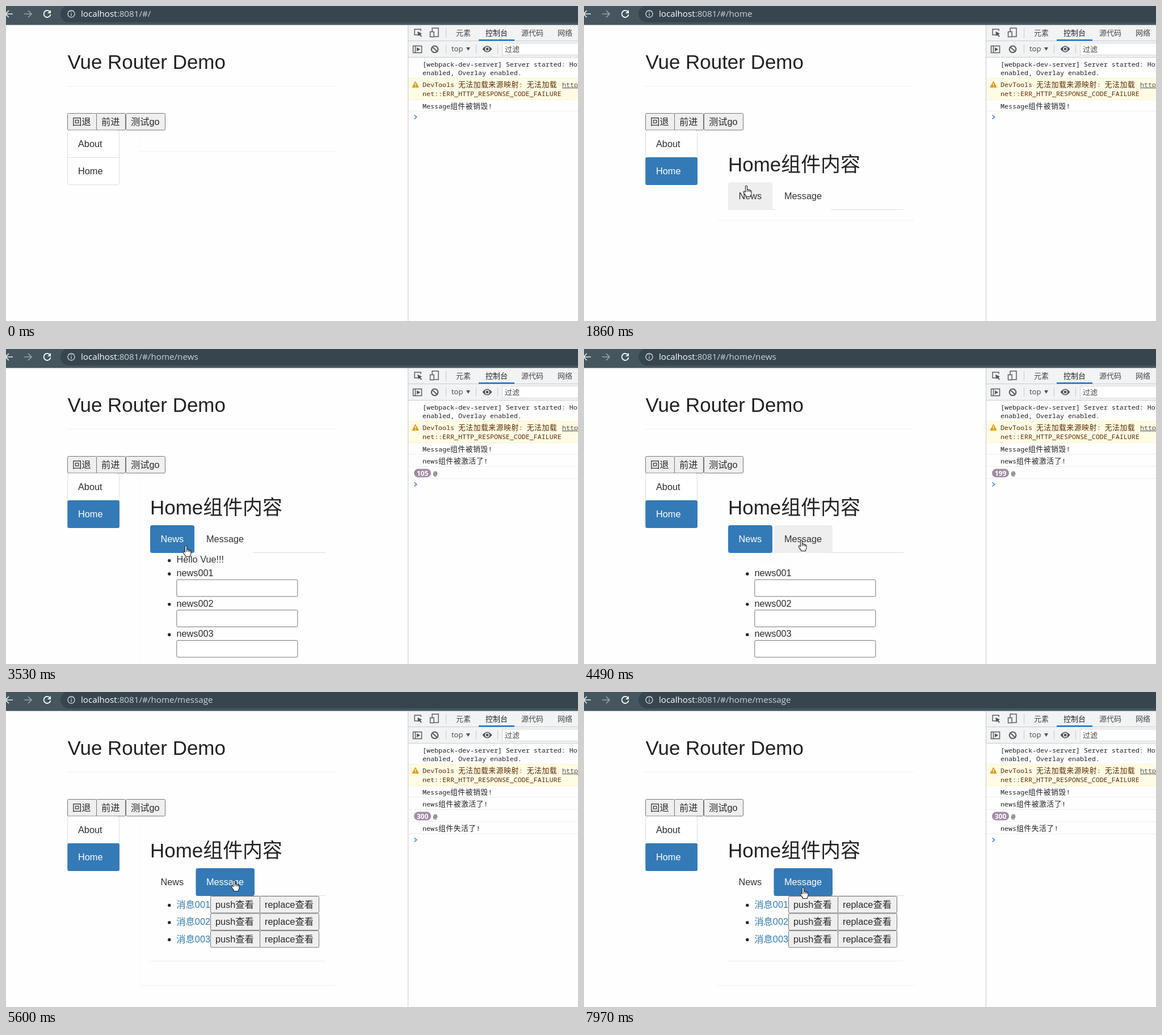
Animation of 1008 by 556 pixels, one loop 8 s. Source, as an HTML page:

```html
<!DOCTYPE html>
<html lang="zh">
<head>
<meta charset="utf-8">
<style>
html, body { margin: 0; width: 100%; height: 100%; overflow: hidden; background: #fefefe; }
svg { display: block; }
text { white-space: pre; }
.page { font: 16.3px "Liberation Sans", "Noto Sans CJK SC", "Noto Sans CJK", sans-serif; fill: #2a2a2a; }
.big { font-size: 34.95px; fill: #222; }
.url { font: 15.2px "Open Sans", "Noto Sans", sans-serif; fill: #ccd3d7; }
.ui { font: 13px "Open Sans", "Noto Sans CJK SC", "Noto Sans CJK", sans-serif; fill: #444; }
.mono { font: 11.66px "Noto Sans Mono", "Noto Sans CJK SC", monospace; fill: #222; }
.cjk { font: 12.8px "Noto Sans CJK SC", "Noto Sans CJK", sans-serif; letter-spacing: .55px; }
.badge { font: bold 12px "Open Sans", "Noto Sans", sans-serif; fill: #fff; text-anchor: middle; }
.icon { fill: none; stroke: #5a5d61; stroke-width: 1.5; }
</style>
</head>
<body>
<svg width="1008" height="556" viewBox="0 0 1008 556"><g id="fixed"></g><g id="live"></g></svg>
<script>
const BLUE = '#337ab7', LOOP = 8000;
// Runs of screen updates: first, last, number of steps
const RUNS = [[130, 900, 12], [1100, 1860, 11], [1930, 2140, 4], [2340, 3100, 11],
  [3180, 3930, 12], [4000, 4780, 12], [4850, 5600, 12], [7190, 7970, 12]];
// Pointer path: time, x, y
const PATH = [[130, 803, 494], [880, 177, 252], [1030, 177, 252], [1400, 158, 288], [1540, 158, 288],
  [1850, 286, 317], [1870, 286, 317], [2140, 286, 331], [2700, 287, 333], [3520, 317, 347],
  [3930, 325, 364], [4150, 345, 389], [4490, 383, 337], [5000, 384, 338], [5520, 402, 332],
  [7120, 402, 332], [7550, 744, 421], [7960, 386, 345]];
const HOME_AT = 1450, NEWS_AT = 2440, MESSAGE_AT = 5530;

const text = (x, y, s, cls = 'page', more = '') => `<text x="${x}" y="${y}" class="${cls}" ${more}>${s}</text>`;
const rect = (x, y, w, h, fill, more = '') => `<rect x="${x}" y="${y}" width="${w}" height="${h}" fill="${fill}" ${more}/>`;
const box = (x, y, w, h, fill, stroke, r = 2) => rect(x + .5, y + .5, w - 1, h - 1, fill, `stroke="${stroke}" rx="${r}"`);
const path = (d, more = 'class="icon"') => `<path d="${d}" ${more}/>`;
const bullet = (y, more = '') => `<circle cx="287.8" cy="${y}" r="2.7" fill="#222" ${more}/>`;
const fill = c => `style="fill:${c}"`;
const mono = (x, y, s, more) =>
  text(x, y, s.replace(/[\u4e00-\u9fff]+/g, '<tspan class="cjk">$&</tspan>'), 'mono', more);
const rule = (x, y, w, c = '#eee') => rect(x, y, w, 1, c);

function button(x, y, w, label, hot) {
  return box(x, y, w, 30.5, hot ? '#e5e5e5' : '#efefef', '#767676') + text(x + 9, y + 21, label);
}

function browserBar() {
  return rect(0, 0, 1008, 33.5, '#45565f') + rect(96, -1, 930, 30, '#37454e', 'rx="15"')
    + path('M12 14H-1M5 8L-1 14L5 20', 'fill="none" stroke="#e8ecee" stroke-width="1.6"')
    + path('M32 14H45M39 8L45 14L39 20', 'fill="none" stroke="#98a4aa" stroke-width="1.6"')
    + path('M77.5 10.5A6 6 0 1 0 78.5 15', 'fill="none" stroke="#fff" stroke-width="1.8"')
    + path('M79 7V13H73Z', 'fill="#fff"')
    + path('M115 8a6 6 0 1 0 .01 0M115 13v4.5M115 10v1.6', 'fill="none" stroke="#d0d6da" stroke-width="1.3"');
}

function devTools() {
  const tabs = [[793, '元素'], [845, '控制台'], [908, '源代码'], [972, '网络']];
  const warn = fill('#5c2b00');
  return rect(709, 34, 299, 522, '#fefefe') + rect(709, 34, 299, 57, '#f1f3f4')
    + rule(709, 61, 299, '#cacdd1') + rule(709, 90, 299, '#cacdd1') + rect(708, 34, 1, 522, '#c5c9cd')
    + tabs.map(([x, s], i) => text(x, 52, s, 'ui', i == 1 ? fill('#222') : '')).join('')
    + rect(833, 59, 63, 2.5, '#1a73c8')
    + rect(775, 39, 1, 17, '#c5c9cd') + [775, 828, 866].map(x => rect(x, 68, 1, 16, '#c5c9cd')).join('')
    + path('M731 51H720V41H731V44') + path('M725 45L733 48.5L730 50L733 53.5L731.5 54.5L728.5 51L726.5 53Z', 'fill="#505357"')
    + path('M751 45V39H762V54H755M747.5 45.5H754V54.5H747.5Z')
    + path('M717.5 70.5H732.5V82.5H717.5ZM721.5 71V82') + path('M724 73L730 76.5L724 80Z', 'fill="#505357"')
    + path('M755.5 70.5a5.8 5.8 0 1 0 .01 0M751.5 72.5L759.5 80', 'class="icon" style="stroke-width:2"')
    + text(785, 80, 'top', 'ui') + path('M811 73H818L814.5 79Z', 'fill="#505357"')
    + path('M839.5 76Q848 65 856.5 76Q848 87 839.5 76Z', 'fill="#505357"')
    + '<circle cx="848" cy="76" r="3.2" fill="#505357" stroke="#f1f3f4" stroke-width="1.5"/>'
    + box(874, 65, 150, 22, '#fff', '#d4d7da', 0) + text(879, 81, '过滤', 'ui')
    + mono(734, 107, '[webpack-dev-server] Server started: Hot') + mono(734, 122, 'enabled, Overlay enabled.')
    + rect(709, 127, 299, 39, '#fff3c4') + rect(709, 128, 299, 37, '#fffbe5')
    + path('M721.5 133L727 143.5H716Z', 'fill="#e39a13" stroke="#e39a13" stroke-linejoin="round"')
    + path('M721.5 136v4M721.5 141v1.5', 'stroke="#fff" stroke-width="1.4"')
    + mono(734, 143, 'DevTools 无法加载来源映射: 无法加载', warn)
    + mono(980, 143, 'http', 'style="fill:#545454;text-decoration:underline"')
    + mono(734, 159, 'net::ERR_HTTP_RESPONSE_CODE_FAILURE', warn)
    + mono(734, 181, 'Message组件被销毁!') + rule(709, 185, 299);
}

document.getElementById('fixed').innerHTML = browserBar() + devTools()
  + text(108.5, 111, 'Vue Router Demo', 'page big') + rule(108, 141, 473)
  + button(108, 189, 52, '回退') + button(159, 189, 52, '前进') + button(211, 189, 70, '测试go');

function snap(t) {
  let at = 0;
  for (const [a, b, n] of RUNS) {
    if (t < a) break;
    const gap = (b - a) / (n - 1);
    for (let k = 0; k < n; k++) {
      const s = Math.floor((a + k * gap) / 10) * 10;
      if (s <= t) at = s;
    }
  }
  return at;
}

function pointerAt(t) {
  const i = PATH.findIndex(p => p[0] > t);
  if (i == 0) return [-99, -99];
  if (i < 0) return PATH.at(-1).slice(1);
  const [a, x, y] = PATH[i - 1], [b, u, v] = PATH[i];
  const p = (t - a) / (b - a), e = p * p * (3 - 2 * p);
  return [x + (u - x) * e, y + (v - y) * e];
}

function pointer([x, y], hand) {
  const d = hand
    ? 'M-1.5 12V1.7Q-1.5 .3 0 .3T1.5 1.7V7Q4 6 4.3 8Q6.5 7 6.8 9Q9 8.3 9 10.5V14Q8.8 16.5 7.5 17.5V19.5H-.5V18Q-3 15.5-4.7 12Q-5.2 10-3.5 10Q-2.5 10.2-1.5 12M1.5 7V11M4.3 8V11M6.8 9V11.5'
    : 'M0 0V16L3.7 12.5L6.3 18.5L8.8 17.4L6.2 11.6H11.3Z';
  return path(d, `transform="translate(${x.toFixed(1)} ${y.toFixed(1)})" fill="#fff" stroke="#222" stroke-width="1.1" stroke-linejoin="round"`);
}

function newsList(n) {
  const fade = `opacity="${1 - n % 100 / 100}"`;
  return bullet(373.5, fade) + text(300.5, 377, 'Hello Vue!!!', 'page', fade)
    + [0, 1, 2].map(i => {
      const y = i * 53.6;
      return bullet(397 + y) + text(300.5, 401 + y, 'news00' + (i + 1)) + box(300.3, 406.7 + y, 214, 30.6, '#fff', '#767676');
    }).join('');
}

function messageList(over) {
  return [0, 1, 2].map(i => {
    const y = 360 + i * 30.4;
    return bullet(y + 16.5) + text(300.3, y + 21, '消息00' + (i + 1), 'page', fill(BLUE))
      + button(360, y, 88, 'push查看', over(360, y, 87, 30)) + button(447, y, 105, 'replace查看', over(447, y, 105, 30));
  }).join('') + rule(254, 474.5, 309);
}

function scene(t) {
  const home = t >= HOME_AT, message = t >= MESSAGE_AT, news = t >= NEWS_AT && !message;
  const at = pointerAt(t);
  const over = (x, y, w, h) => at[0] >= x && at[0] < x + w && at[1] >= y && at[1] < y + h;
  const overAbout = over(108, 220, 92, 47), overHome = over(108, 267, 92, 49);
  const overNews = home && over(254, 311, 78, 49), overMessage = home && over(334, 311, 104, 49);
  const count = Math.min(300, Math.round((t - NEWS_AT) / 10.3));
  const address = '/#/' + (home ? 'home' : '') + (news ? '/news' : message ? '/message' : '');
  const bottom = message ? 518 : news ? 600 : home ? 379 : 257;

  let s = text(132, 19, `<tspan fill="#fff">localhost</tspan>:8081${address}`, 'url');
  s += path(`M235.5 222V${bottom - 4}M581 222V${bottom - 4}`, 'stroke="#fafbfb"')
    + path(`M235.5 ${bottom - 3}q0 3 3 3H578q3 0 3-3`, 'fill="none" stroke="#eef2f2"');
  s += box(108, 219, 92, 97, '#fff', '#ddd', 4);
  if (overAbout) s += rect(109, 220, 90, 47, '#f5f5f5');
  s += rule(109, 267, 90, '#ddd');
  if (home) s += rect(108.3, 267, 91.7, 49, BLUE, 'rx="3"');
  else if (overHome) s += rect(109, 268, 90, 47, '#f5f5f5');
  s += text(127, 249, 'About') + text(127, 297, 'Home', 'page', home ? fill('#fff') : '');

  if (home) {
    const tab = (x, w, label, on, hot) =>
      (on || hot ? rect(x, 311, w, 49, on ? BLUE : '#eee', 'rx="4"') : '')
      + text(x + 18.5, 341, label, 'page', fill(on ? '#fff' : '#333'));
    s += text(254, 292, 'Home组件内容', 'page big') + rule(435, 359, 128, '#ddd');
    if (!message) s += rule(254, 359, 83, '#ddd');
    if (overMessage) s += rule(334, 359, 104, '#ddd');
    s += tab(254, 78, 'News', news, overNews) + tab(334.5, 103.5, 'Message', message, overMessage);
  }
  if (news) s += newsList(count);
  if (message) s += messageList(over);

  let prompt = 196;
  if (news || message) {
    prompt = 239;
    s += mono(734, 202, 'news组件被激活了!') + rule(709, 207, 299) + rule(709, 228, 299)
      + rect(719, 211.5, 30, 15, '#a18ca3', 'rx="7.5"')
      + text(734, 223.5, count, 'badge') + mono(753, 224, '@');
  }
  if (message) {
    prompt = 261;
    s += mono(734, 245, 'news组件失活了!') + rule(709, 250, 299);
  }
  s += path(`M719.5 ${prompt - 3.5}l4 3.5l-4 3.5`, 'fill="none" stroke="#367cf1" stroke-width="1.6"');
  return s + pointer(at, overAbout || overHome || overNews || overMessage);
}

const live = document.getElementById('live');
let shown = -1;
function draw(now) {
  const t = snap(now % LOOP);
  if (t !== shown) live.innerHTML = scene(shown = t);
  requestAnimationFrame(draw);
}
draw(performance.now());
</script>
</body>
</html>
```
